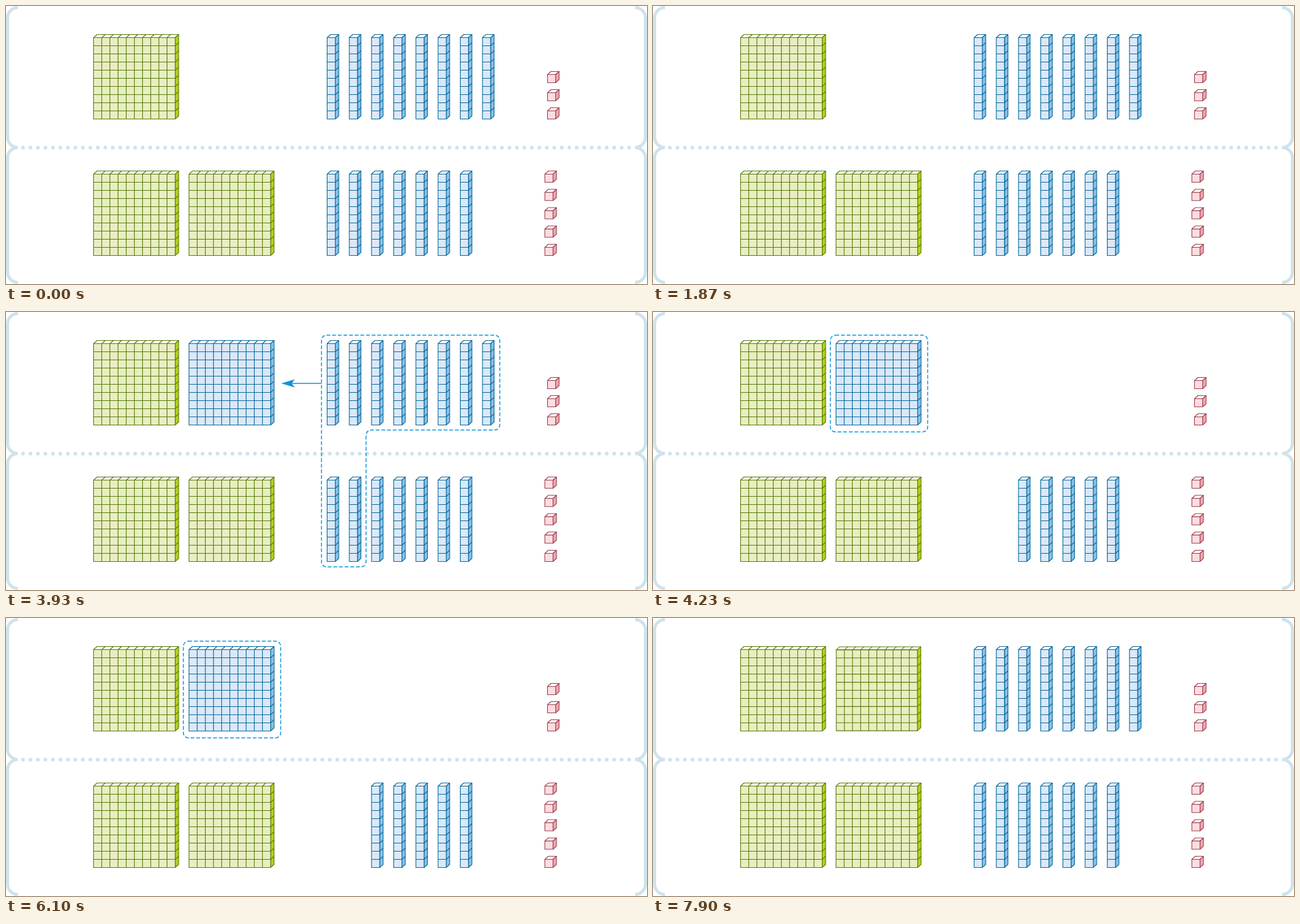
An HTML page for the animation above (8070 ms loop, 1021x444 px).

```html
<!DOCTYPE html>
<html lang="en">
<head>
<meta charset="utf-8">
<title>Regrouping ten tens</title>
<style>
html, body { margin: 0; width: 100%; height: 100%; overflow: hidden; background: #fff; }
svg { display: block; }
path { fill: none; }
.bracket { stroke: #cfe3ec; stroke-width: 5; }
.dots { stroke: #cfe3ec; stroke-width: 6; stroke-linecap: round; stroke-dasharray: 0 11.92; }
.dash { stroke: #0a95dc; stroke-width: 1.5; stroke-dasharray: 6 3; }
.line { stroke: #0a95dc; stroke-width: 1.5; }
.head { fill: #0a95dc; }
.solid path { stroke-width: 1.1; stroke-linejoin: round; }
</style>
</head>
<body>
<svg width="1021" height="444" viewBox="0 0 1021 444">
  <g class="bracket" id="left">
    <path d="M19 2.5A16.5 16.5 0 0 0 2.5 19V209.5A16.5 16.5 0 0 0 19 226A16.5 16.5 0 0 0 2.5 242.5V425A16.5 16.5 0 0 0 19 441.5"/>
  </g>
  <use href="#left" transform="matrix(-1 0 0 1 1021 0)"/>
  <path class="dots" d="M27 226.3H993"/>
  <g id="fixed"></g>
  <g id="tens"></g>
  <g id="blue"></g>
  <g id="green" transform="translate(2.2 .7) scale(.994)"></g>
  <path class="dash" id="loop" d="M510.500 37H778.500a8 8 0 0 1 8 8V180.500a8 8 0 0 1 -8 8H581.500a8 8 0 0 0 -8 8V399a8 8 0 0 1 -8 8H510.500a8 8 0 0 1 -8 -8V45a8 8 0 0 1 8 -8z"/>
  <clipPath id="reveal"><rect id="window" y="100" width="66" height="30"/></clipPath>
  <g id="arrow" clip-path="url(#reveal)">
    <path class="line" d="M502.500 114H453"/>
    <path class="head" d="M438.500 114L460 107.500L455 114L460 120.500z"/>
  </g>
  <rect class="dash" id="square" x="282.500" y="37" width="155" height="154.500" rx="8" fill="none"/>
</svg>
<script>
const CELL = 13, DX = 5.5, DY = 5, LOOP = 8070, TICK = 30;
const PAINT = {
  green: { front: '#e9eec2', side: '#b4cf1c', top: '#fbfcf0', line: '#587d0c' },
  blue: { front: '#dbe8f8', side: '#8cc0e8', top: '#fafdff', line: '#086a99' },
  pink: { front: '#fbdde0', side: '#eba8b0', top: '#fffafa', line: '#a03c50' }
};
const el = id => document.getElementById(id);

// A slab of unit cubes; x, y is the front top-left corner.
function solid(parent, x, y, cols, rows, paint) {
  const { front, side, top, line } = PAINT[paint];
  const w = cols * CELL, h = rows * CELL;
  const face = (fill, d) => `<path fill="${fill}" style="fill:${fill}" d="${d}"/>`;
  let grid = '';
  for (let i = 1; i < cols; i++) grid += `M${x + i * CELL} ${y + h}v${-h}l${DX} ${-DY}`;
  for (let j = 1; j < rows; j++) grid += `M${x} ${y + j * CELL}h${w}l${DX} ${-DY}`;
  parent.innerHTML += `<g class="solid" stroke="${line}">` +
    face(top, `M${x} ${y}l${DX} ${-DY}h${w}l${-DX} ${DY}z`) +
    face(side, `M${x + w} ${y}l${DX} ${-DY}v${h}l${-DX} ${DY}z`) +
    face(front, `M${x} ${y}h${w}v${h}h${-w}z`) +
    `<path d="${grid}"/></g>`;
}

const TOP = 50.5, LOW = 268.5, FIRST = 139.5, SECOND = 291.5;
const fixed = el('fixed');
solid(fixed, FIRST, TOP, 10, 10, 'green');
solid(fixed, FIRST, LOW, 10, 10, 'green');
solid(fixed, SECOND, LOW, 10, 10, 'green');
solid(el('blue'), SECOND, TOP, 10, 10, 'blue');
solid(el('green'), SECOND, TOP, 10, 10, 'green');
for (let i = 0; i < 8; i++) {
  const x = 511.5 + i * 35.35;
  solid(el('tens'), x, TOP, 1, 10, 'blue');
  if (i < 7) solid(i < 2 ? el('tens') : fixed, x, LOW, 1, 10, 'blue');
}
for (let i = 0; i < 3; i++) solid(fixed, 862.5, 109.5 + i * 29, 1, 1, 'pink');
for (let i = 0; i < 5; i++) solid(fixed, 858.3, LOW + i * 29.25, 1, 1, 'pink');

// Progress 0..1 in ticks, the first one landing at the start time.
const ramp = (t, start, steps) =>
  Math.min(1, Math.max(0, (Math.floor((t - start) / TICK) + 1) / steps));

// Two linear dips in opacity.
function pulse(t, start) {
  const phase = ramp(t, start, 40) * 2 % 1;
  return 1 - 0.65 * (1 - Math.abs(1 - 2 * phase));
}

const fade = (id, value) => el(id).setAttribute('opacity', value);

function draw(t) {
  const trade = ramp(t, 3960, 10), recolor = ramp(t, 6630, 10);
  const leave = 1 - trade;
  fade('tens', t >= 7900 ? 1 : pulse(t, 700) * leave);
  fade('loop', ramp(t, 2570, 10) * leave);
  fade('arrow', leave);
  el('window').setAttribute('x', 503 - 66 * ramp(t, 2870, 12));
  fade('blue', ramp(t, 3660, 10) * pulse(t, 4930) * (1 - recolor));
  fade('square', trade * (1 - recolor));
  fade('green', recolor);
}

const begin = performance.now();
function frame() {
  draw((performance.now() - begin) % LOOP);
  requestAnimationFrame(frame);
}
frame();
</script>
</body>
</html>
```
